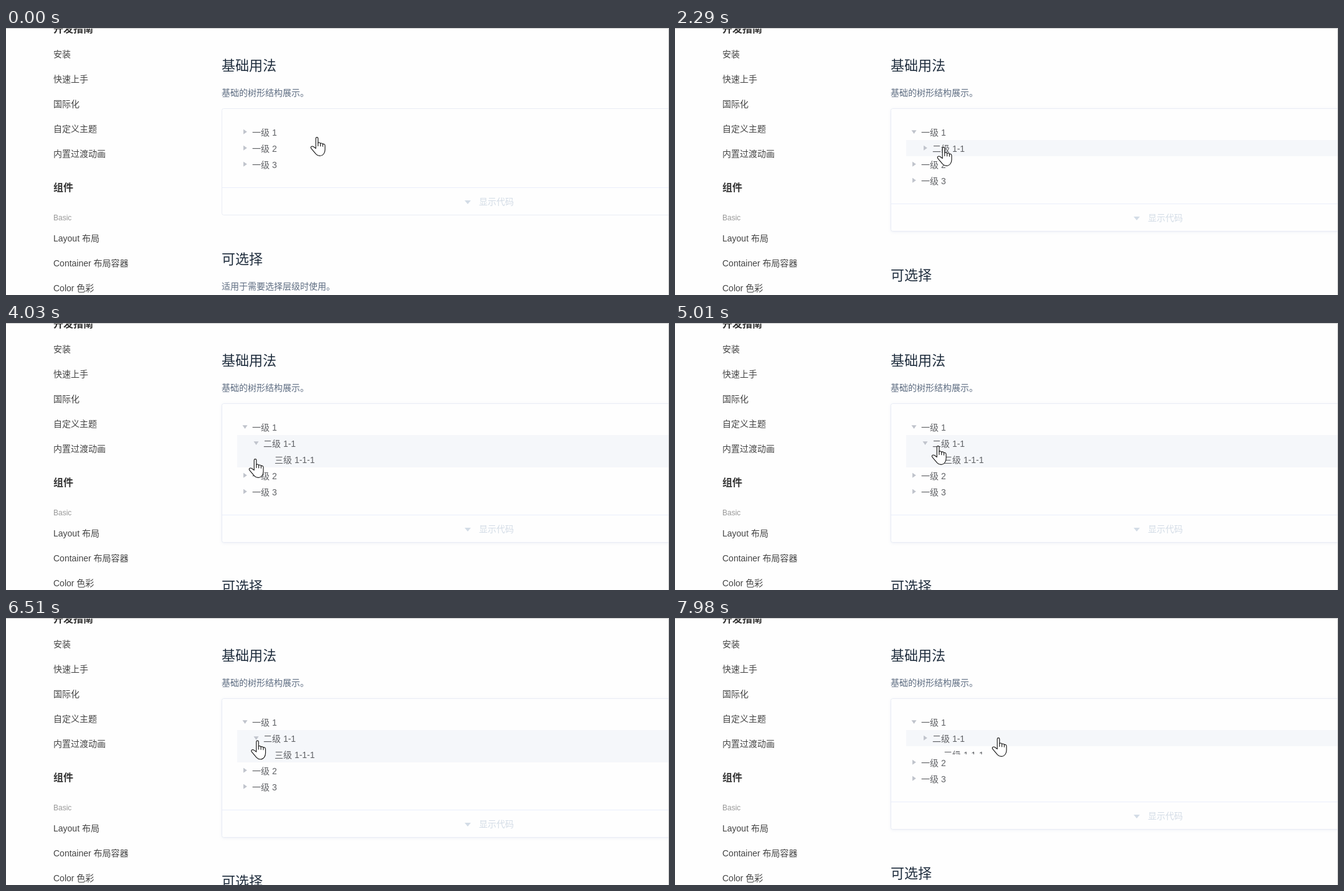
Animation of 1064x429 px, one loop 8000 ms. Source, as an HTML page:

```html
<!DOCTYPE html>
<html lang="zh-CN">
<head>
<meta charset="utf-8">
<title>树形控件</title>
<style>
html, body { margin: 0; width: 100%; height: 100%; overflow: hidden; background: #fefefe; }
svg { display: block; }
text { font: 14px "Liberation Sans", "Noto Sans CJK SC", "Noto Sans CJK", sans-serif; fill: #606266; }
.menu text { fill: #444; }
.menu .head { font-size: 16px; font-weight: bold; fill: #333; }
.menu .group { font-size: 12px; fill: #999; }
.title { font-size: 22px; fill: #1f2d3d; }
.note { fill: #5e6d82; }
.pale, .pale text { fill: #d3dce6; }
.hover { fill: #f5f7fa; }
.caret { fill: #c0c4cc; }
.line { fill: none; stroke: #eaeefb; }
#card { fill: #fefefe; stroke: #e9ecf5; }
#card.raised { filter: drop-shadow(0 1px 2px rgba(228,232,242,.6)); }
#hand { fill: #fff; stroke: #1a1a1a; stroke-width: 1.15; stroke-linejoin: round; stroke-linecap: round; }
</style>
</head>
<body>
<svg width="1064" height="429" viewBox="0 0 1064 429">
  <defs>
    <clipPath id="fold"><rect id="foldBox" x="360" y="180" width="704" height="0"/></clipPath>
    <path id="tri" d="M-2.5-4L3.3 0L-2.5 4Z"/>
  </defs>

  <g class="menu">
    <text class="head" x="76" y="7">开发指南</text>
    <text x="76" y="47">安装</text>
    <text x="76" y="87">快速上手</text>
    <text x="76" y="127">国际化</text>
    <text x="76" y="167">自定义主题</text>
    <text x="76" y="207">内置过渡动画</text>
    <text class="head" x="76" y="262">组件</text>
    <text class="group" x="76" y="309">Basic</text>
    <text x="76" y="343">Layout 布局</text>
    <text x="76" y="383">Container 布局容器</text>
    <text x="76" y="423">Color 色彩</text>
  </g>

  <text class="title" x="346" y="68">基础用法</text>
  <text class="note" x="346" y="109">基础的树形结构展示。</text>

  <rect id="card" x="346.5" y="129.5" width="740" height="171" rx="3"/>

  <rect id="hover1" class="hover" x="375" y="153" width="35" height="27" rx="6"/>
  <use id="caret1" class="caret" href="#tri"/>
  <text x="395" y="173">一级 1</text>

  <g clip-path="url(#fold)">
    <rect id="hover2" class="hover" x="371" y="180" width="693" height="26"/>
    <rect id="hover3" class="hover" x="371" y="206" width="693" height="26"/>
    <use id="caret2" class="caret" href="#tri"/>
    <text x="413" y="199">二级 1-1</text>
    <text x="431" y="225">三级 1-1-1</text>
  </g>

  <g id="below">
    <use class="caret" href="#tri" x="383.5" y="192.8"/>
    <text x="395" y="199">一级 2</text>
    <use class="caret" href="#tri" x="383.5" y="218.8"/>
    <text x="395" y="225">一级 3</text>
    <path class="line" d="M347 256.5H1064"/>
    <g class="pale">
      <path d="M736 277H746L741 283Z"/>
      <text x="759" y="284">显示代码</text>
    </g>
    <text class="title" x="346" y="379">可选择</text>
    <text class="note" x="346" y="420">适用于需要选择层级时使用。</text>
  </g>

  <path d="M0 .5H1063.5V429" fill="none" stroke="#c8c8c8"/>

  <g id="hand">
    <path d="M8.7 18.5V2.4a1.8 1.8 0 0 1 3.6 0V9.6q2-1.6 3.8.8q2.2-1.2 3.8 1q3.6-.6 3.6 3V20.5Q23.5 24 21.5 27Q19 30.4 15 30.4Q11.5 30.4 9 27.6L1.2 18.4Q0 16.2 2 15.2Q3.4 14.6 5 15.8Z"/>
    <path d="M12.3 9.6V14.5M16.1 10.4V14.8M19.9 11.4V15.2" fill="none"/>
  </g>
</svg>
<script>
const LOOP = 8000, ROW = 26, FOLD_MS = 300, TURN_MS = 150;
const $ = id => document.getElementById(id);

// pointer moves: from, to, x, y
const origin = [488.5, 175];
const moves = [
  [110, 870, 383.5, 166],
  [1810, 2290, 420.5, 191],
  [2290, 2470, 397, 194],
  [2650, 3400, 412, 206],
  [3430, 4030, 389.5, 218],
  [4340, 4660, 427, 200],
  [4820, 5200, 396.5, 194],
  [6450, 6750, 364, 218],
  [6750, 7370, 499.5, 212],
  [7370, 7980, 508.5, 192]
];

// clicks that flip each node between closed and open
const clicks1 = [870], clicks2 = [2470, 5250, 6000, 7830];

const show = (id, on) => $(id).setAttribute("visibility", on ? "visible" : "hidden");
const ease = k => { k = Math.min(1, Math.max(0, k)); return k * k * (3 - 2 * k); };
const openness = (t, clicks, ms) =>
  clicks.reduce((sum, at, i) => sum + (i % 2 ? -1 : 1) * ease((t - at) / ms), 0);

function pointer(t) {
  return moves.reduce(([px, py], [from, to, x, y]) => {
    const k = ease((t - from) / (to - from));
    return [px + (x - px) * k, py + (y - py) * k];
  }, origin);
}

function turn(id, x, y, open) {
  $(id).setAttribute("transform", `translate(${x} ${y}) rotate(${90 * open})`);
}

function draw(t) {
  const fold = Math.round(ROW * (openness(t, clicks1, FOLD_MS) + openness(t, clicks2, FOLD_MS)));
  $("foldBox").setAttribute("height", fold);
  $("below").setAttribute("transform", `translate(0 ${fold})`);
  $("card").setAttribute("height", 171 + fold);
  $("card").classList.toggle("raised", t >= clicks1[0]);
  turn("caret1", 383.5, 166.8, openness(t, clicks1, TURN_MS));
  turn("caret2", 401.5, 192.8, openness(t, clicks2, TURN_MS));

  // the second row stays lit until the pointer has passed along the third
  const onThird = t > 7300 && t < 7760;
  show("hover1", t > 780 && t < 1980);
  show("hover2", t >= 1980 && !onThird);
  show("hover3", t > 3100 && t < 5050 || t > 6350 && t < 7760);
  $("hand").setAttribute("transform", `translate(${pointer(t)})`);
}

const start = performance.now();
function tick() {
  draw((performance.now() - start) % LOOP);
  requestAnimationFrame(tick);
}
tick();
</script>
</body>
</html>
```
